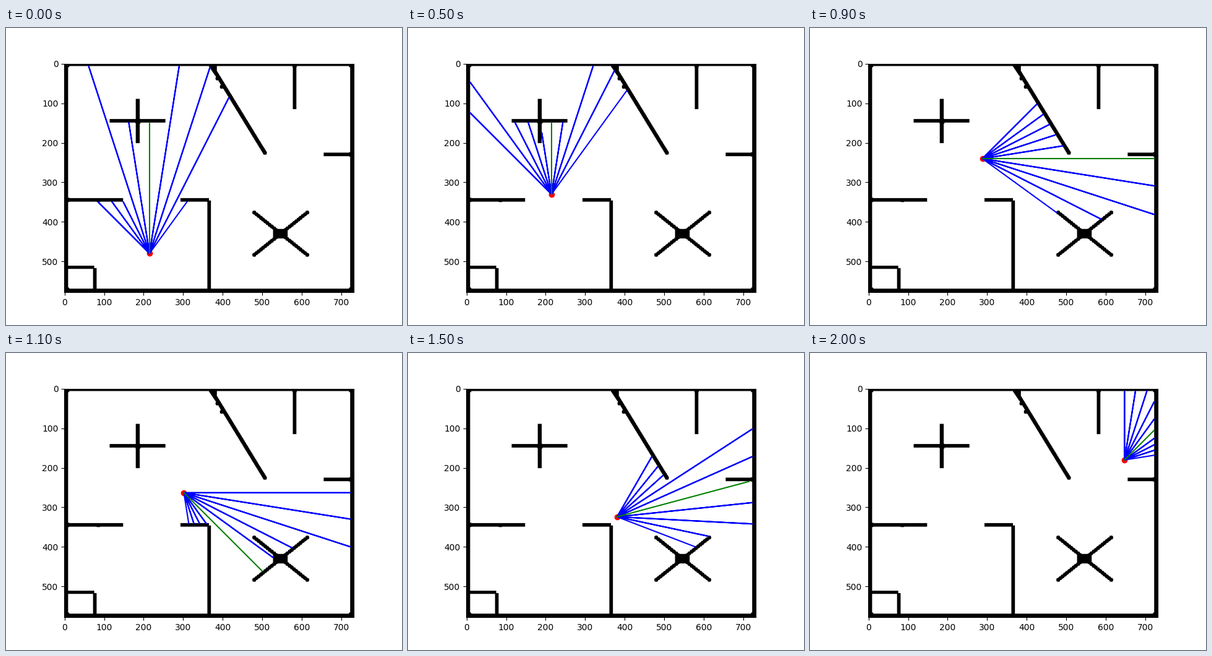
Write a matplotlib script that moves like this. It is 640x480 px and loops after 2100 ms.

```python
import numpy as np
import matplotlib.pyplot as plt
from matplotlib.animation import FuncAnimation

W, H = 732, 579
FRAMES, INTERVAL = 21, 100
Y, X = np.mgrid[:H, :W]
wall = np.zeros((H, W), bool)


def rect(x0, y0, x1, y1):
    wall[y0:y1, x0:x1] = True


def disc(x, y, r):
    wall[(X - x) ** 2 + (Y - y) ** 2 <= r * r] = True


def stroke(x0, y0, x1, y1, r, step):
    n = int(np.hypot(x1 - x0, y1 - y0) / step) + 1
    for x, y in zip(np.linspace(x0, x1, n), np.linspace(y0, y1, n)):
        disc(x, y, r)


def build_map():
    # Outer walls
    rect(0, 0, W, 7)
    rect(0, 570, W, H)
    rect(0, 0, 10, H)
    rect(723, 0, W, H)
    for x in (8, 724):
        for y in (5, 571):
            disc(x, y, 5)

    # Lower left room and closet
    rect(10, 341, 149, 350)
    rect(82, 345, 91, 351)
    disc(9, 345, 6)
    rect(294, 341, 366, 350)
    rect(362, 347, 371, 570)
    rect(10, 512, 76, 520)
    rect(73, 518, 82, 570)

    # Cross
    rect(115, 141, 256, 150)
    rect(181, 90, 191, 202)
    disc(186, 146, 8)

    # Slanted wall
    stroke(372, 6, 507, 226, 5, 3)
    wall[(X >= 365) & (X < 386) & (Y < 32) & (Y - 7 < 1.5 * (X - 365))] = True
    disc(387, 38, 5)
    disc(398, 59, 5)

    # Right-hand stubs
    rect(578, 0, 587, 116)
    disc(582, 6, 6)
    rect(656, 226, 723, 235)
    disc(723, 230, 6)

    # Table with four legs
    stroke(480, 377, 614, 484, 5, 7)
    stroke(480, 484, 614, 377, 5, 7)
    rect(528, 419, 565, 443)


# Route: step, x, y; heading in degrees, counter-clockwise from right
ROUTE = np.array([
    (0, 215, 480), (8, 215, 240), (9, 288, 240), (11, 302, 263),
    (12, 310, 275), (13, 326, 294), (14, 350, 311), (15, 381, 324),
    (16, 434, 311), (17, 488, 290), (18, 541, 261), (20, 648, 180),
])
TURNS = np.array([(0, 90), (7, 90), (9, 0), (11, -45), (15, 15), (20, 45)])


def pose(i):
    t, xs, ys = ROUTE.T
    return np.interp(i, t, xs), np.interp(i, t, ys), np.interp(i, *TURNS.T)


def cast(x, y, angle):
    a = np.radians(angle)
    d = np.arange(0, 950, 0.5)
    px, py = x + d * np.cos(a), y - d * np.sin(a)
    cols = np.clip(np.rint(px).astype(int), 0, W - 1)
    rows = np.clip(np.rint(py).astype(int), 0, H - 1)
    hit = np.argmax(wall[rows, cols])
    return px[hit], py[hit]


build_map()
fig, ax = plt.subplots(figsize=(6.4, 4.8), dpi=100)
ax.imshow(~wall, cmap="gray", vmin=0, vmax=1)
dot, = ax.plot([], [], "ro", zorder=2)
rays, = ax.plot([], [], color="blue", zorder=3)
ahead, = ax.plot([], [], color="green", zorder=4)
ax.set_xlim(-0.5, W - 0.5)
ax.set_ylim(H - 0.5, -0.5)


def update(i):
    x, y, heading = pose(i)
    points = []
    for offset in range(45, -45, -9):
        if offset:
            points += [(x, y), cast(x, y, heading + offset)]
    rays.set_data(*zip(*points))
    ahead.set_data(*zip((x, y), cast(x, y, heading)))
    dot.set_data([x], [y])
    return dot, rays, ahead


anim = FuncAnimation(fig, update, frames=FRAMES, interval=INTERVAL,
                     repeat=True, repeat_delay=0)
plt.show()
```
